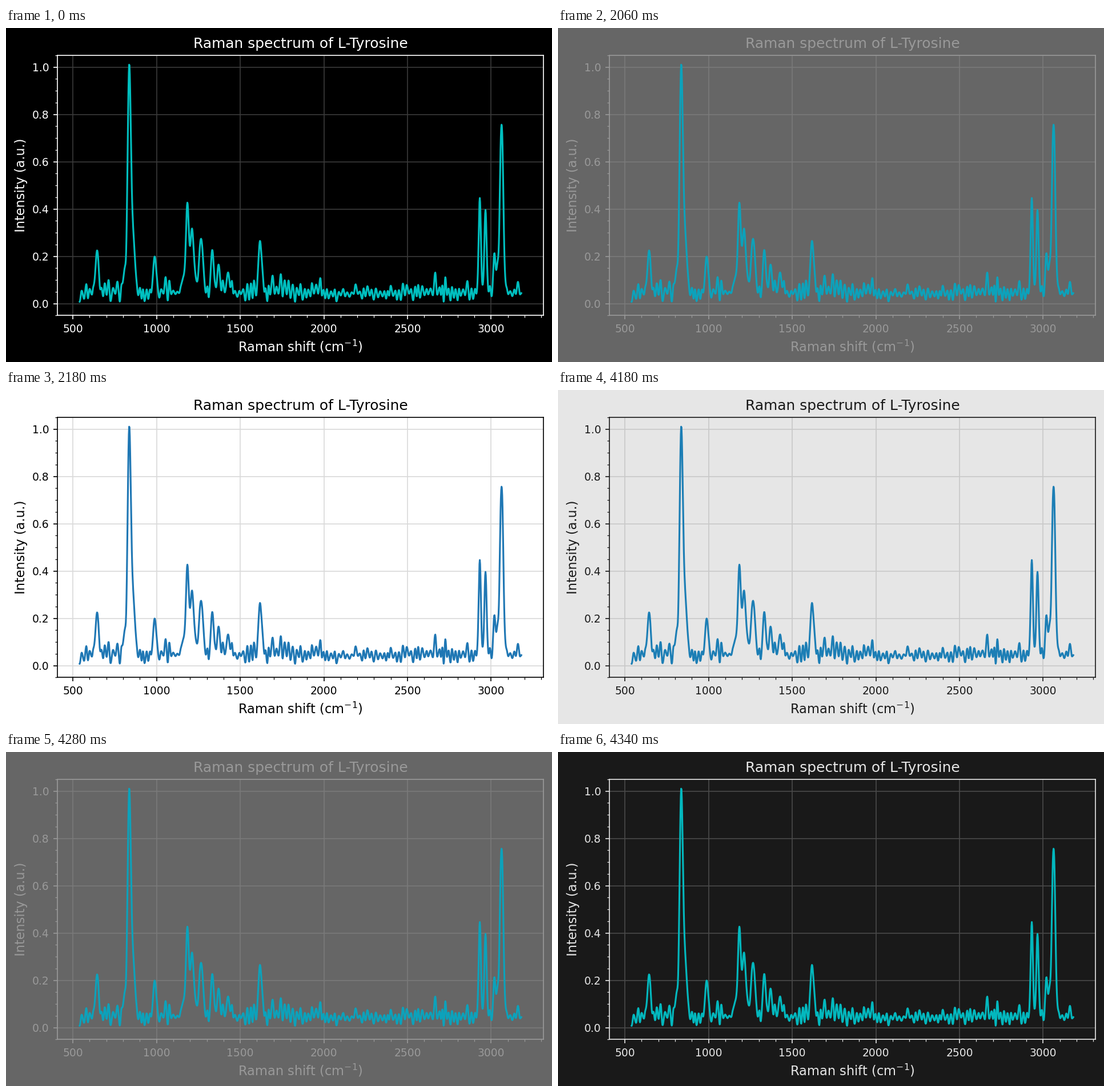
Write a matplotlib script that moves like this. It is 956 px wide and 586 px high and loops after 4.36 s.

```python
import numpy as np
import matplotlib.pyplot as plt
from matplotlib.animation import FuncAnimation
from matplotlib.ticker import MultipleLocator

W, H, DPI = 956, 586, 150
FRAMES, STEP = 218, 20
LEFT, RIGHT, TOP, BOTTOM = 90.4, 940.8, 48, 504.3
START, END = 540, 3180

plt.rcParams["font.family"] = "DejaVu Sans"

# Raman bands: centre and height
BANDS = [
    (644, .21), (805, .1), (836, .97), (853, .18), (866, .16), (989, .19),
    (1158, .08), (1184, .42), (1211, .29), (1228, .09), (1259, .18),
    (1273, .18), (1333, .22), (1369, .14), (1428, .11), (1617, .24),
    (1632, .08), (2932, .445), (2966, .395), (3019, .2), (3038, .14),
    (3056, .5), (3067, .54), (3079, .09),
]


def spectrum(x):
    """Gaussian bands that narrow with the shift."""
    total = np.zeros_like(x)
    for centre, height in BANDS:
        width = 10.8 - .0013 * centre
        total += height * np.exp(-((x - centre) / width) ** 2 / 2)
    return total


def ripple(x, rng):
    """Seeded lows and highs in turn, joined by cosine easing."""
    knots = START + np.append(0, np.cumsum(rng.uniform(8, 15, 300)))
    r = rng.random(knots.size)
    drift = 1 + .15 * np.cos(2 * np.pi * (knots - 1750) / 950)
    low = .042 - .038 * r ** 2
    high = (.055 + .06 * r ** 3) * drift
    level = np.where(np.arange(knots.size) % 2, high, low)
    level[0] = .008
    place = np.interp(x, knots, np.arange(knots.size))
    i = place.astype(int)
    ease = (1 - np.cos(np.pi * (place - i))) / 2
    return level[i] + (level[i + 1] - level[i]) * ease


def rgb(text):
    return np.array([int(text[k:k + 2], 16) / 255 for k in (0, 2, 4)])


# Dark and light colours of each part
THEME = {
    "back": (rgb("000000"), rgb("ffffff")),
    "ink": (rgb("ffffff"), rgb("000000")),
    "grid": (rgb("3a3a3a"), rgb("d9d9d9")),
    "curve": (rgb("00bfbf"), rgb("1f77b4")),
}

shift = np.arange(START, END + 1, 2.0)
bands = spectrum(shift)
noise = ripple(shift, np.random.default_rng(7)) * np.exp(-8 * bands)

fig = plt.figure(figsize=(W / DPI, H / DPI), dpi=DPI)
ax = fig.add_axes([LEFT / W, 1 - BOTTOM / H,
                   (RIGHT - LEFT) / W, (BOTTOM - TOP) / H])
curve, = ax.plot(shift, bands + noise, lw=1.5)
ax.set_xlim(408.5, 3311.7)
ax.set_ylim(-.05, 1.05)
for axis, major, minor in ((ax.xaxis, 500, 100), (ax.yaxis, .2, .05)):
    axis.set_major_locator(MultipleLocator(major))
    axis.set_minor_locator(MultipleLocator(minor))
ax.tick_params(labelsize=9)
ax.grid(True, lw=.8)
labels = [
    ax.set_title("Raman spectrum of L-Tyrosine", fontsize=11.95),
    ax.set_xlabel("Raman shift (cm$^{-1}$)", fontsize=10.8, labelpad=3.4),
    ax.set_ylabel("Intensity (a.u.)", fontsize=10.8),
]


def update(i):
    light = np.clip((i - 99) / 10, 0, 1) - np.clip((i - 208) / 10, 0, 1)
    c = {name: tuple(dark + (bright - dark) * light)
         for name, (dark, bright) in THEME.items()}
    fig.set_facecolor(c["back"])
    ax.set_facecolor(c["back"])
    curve.set_color(c["curve"])
    ax.tick_params(which="both", color=c["ink"], labelcolor=c["ink"],
                   grid_color=c["grid"])
    for part in labels:
        part.set_color(c["ink"])
    for spine in ax.spines.values():
        spine.set_edgecolor(c["ink"])
    return []


anim = FuncAnimation(fig, update, frames=FRAMES, interval=STEP,
                     repeat=True, repeat_delay=0, blit=False)
plt.show()
```
